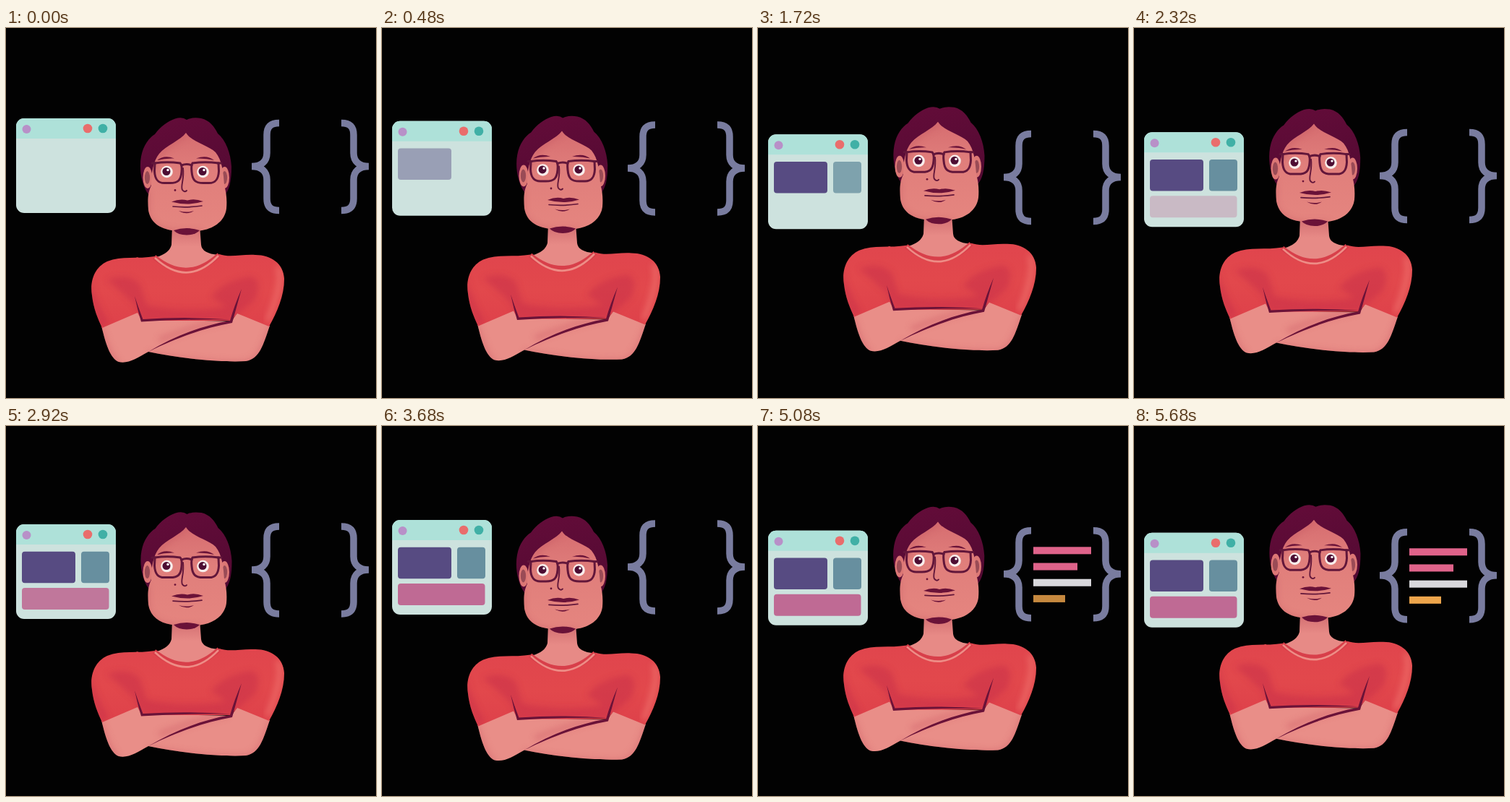
These frames come from a looping animation (512x512 px, 6000 ms). An HTML page:

```html
<!DOCTYPE html>
<html lang="en">
<head>
<meta charset="utf-8">
<title>Developer</title>
<style>
html, body { margin: 0; width: 100%; height: 100%; overflow: hidden; background: #020202; }
svg { display: block; width: 100vw; height: 100vh; }
.line { fill: none; stroke: #62163a; stroke-linecap: round; }
.dark { fill: #6a1238; }
</style>
</head>
<body>
<svg viewBox="0 0 512 512">
  <defs>
    <linearGradient id="shirt" x2="0" y2="1">
      <stop offset="0" stop-color="#e0454d"/>
      <stop offset=".5" stop-color="#e2484c"/>
      <stop offset="1" stop-color="#de414a"/>
    </linearGradient>
    <linearGradient id="face" x2="0" y2="1">
      <stop offset="0" stop-color="#d66d70"/>
      <stop offset=".4" stop-color="#e07e7b"/>
      <stop offset="1" stop-color="#e5857f"/>
    </linearGradient>
    <linearGradient id="neck" x2="0" y2="1">
      <stop offset="0" stop-color="#cf6a6e"/>
      <stop offset=".5" stop-color="#e78a86"/>
    </linearGradient>
    <linearGradient id="hairFill" x2=".3" y2="1">
      <stop offset="0" stop-color="#640c39"/>
      <stop offset="1" stop-color="#540a33"/>
    </linearGradient>
    <filter id="soft" x="-30%" y="-30%" width="160%" height="160%"><feGaussianBlur stdDeviation="4"/></filter>
    <path id="shirtShape" d="M206 316C182 320 160 315 140 323C121 332 116 352 119 370C121 388 127 402 133 415L182 394L188 405L312 405L320 395L364 413C375 393 385 371 385 347C384 326 367 314 345 314C325 313 310 318 295 313Q251 352 206 316Z"/>
    <path id="armShape" d="M132 412C138 437 144 457 156 462C169 465 181 457 197 448C240 457 296 463 332 461C351 458 356 438 365 412L320 394L312 406L189 403L183 392Z"/>
    <path id="faceShape" d="M249 145C241 156 222 162 212 174C204 184 201 200 201 218C196 228 196 238 197 252C200 270 214 279 235 280.500H268C289 278 303 266 305 250C306 238 305 228 302 218C301 200 299 183 290 172C280 162 257 158 249 145Z"/>
    <clipPath id="inShirt"><use href="#shirtShape"/></clipPath>
    <clipPath id="inArms"><use href="#armShape"/></clipPath>
    <clipPath id="inFace"><use href="#faceShape"/></clipPath>
    <path id="brace" d="M378 131.500C366 131.500 361 137 361 148V173C361 185 353 191.500 340 191.500C353 191.500 361 198 361 210V236C361 247 366 252.500 378 252.500" fill="none" stroke="#797c9f" stroke-width="9.500"/>
  </defs>

  <g id="win">
    <rect x="14" y="125" width="138" height="131" rx="11" fill="#cde2de"/>
    <path d="M14 153V136a11 11 0 0 1 11-11H141a11 11 0 0 1 11 11V153Z" fill="#aee1d9"/>
    <circle cx="28.500" cy="140" r="6" fill="#b890c8"/>
    <circle cx="113" cy="139" r="6.300" fill="#e96d6c"/>
    <circle cx="134" cy="139" r="6.300" fill="#40b0a6"/>
    <rect class="fade" x="22" y="162.700" width="74" height="43.500" rx="4" fill="#574b82"/>
    <rect class="fade" x="104" y="162.700" width="39" height="43.500" rx="4" fill="#678f9f"/>
    <rect class="fade" x="22" y="213" width="120.500" height="30" rx="4" fill="#bf6a94"/>
  </g>

  <g id="code">
    <use href="#brace"/>
    <use href="#brace" transform="matrix(-1 0 0 1 842 0)"/>
    <rect class="fade" x="381" y="154" width="80" height="10" fill="#df638a"/>
    <rect class="fade" x="381" y="176.200" width="61" height="10" fill="#df638a"/>
    <rect class="fade" x="381" y="198.400" width="80" height="10" fill="#d9d8dc"/>
    <rect class="fade" x="381" y="220.600" width="44" height="10" fill="#eda54c"/>
  </g>

  <g id="man">
    <path id="hair" fill="url(#hairFill)" d="M197 230C187 216 184 194 187 178C190 162 198 152 206 147C214 136 224 129 234 125.500Q244 122.500 250 127Q258 123 270 125C282 128 288 136 293 146C304 155 311 173 312 192C312 212 309 225 302 232Z"/>

    <path fill="url(#neck)" d="M230 272L229 300Q226 312 208 317Q250 350 294 314Q271 312 270 300L268 272Z"/>
    <use href="#armShape" fill="#e98e88"/>
    <g clip-path="url(#inArms)">
      <g filter="url(#soft)" fill="none" stroke="#d66b70" stroke-width="8" opacity=".6">
        <path d="M130 413C138 440 146 460 156 465"/>
        <path d="M197 451C240 460 296 466 332 464C352 459 358 438 367 412"/>
        <path d="M212 432Q260 412 306 404"/>
      </g>
    </g>
    <use href="#shirtShape" fill="url(#shirt)"/>
    <g clip-path="url(#inShirt)">
      <g filter="url(#soft)" fill="#c62d48" opacity=".5">
        <path d="M140 348Q172 338 186 356L194 384Q250 396 306 386L284 372Q300 350 340 344Q356 352 344 376L318 398L310 405H188L178 382Z"/>
        <path d="M117 345Q124 380 142 408L132 416L116 380Z"/>
      </g>
      <path d="M376 330Q386 348 362 406" fill="none" stroke="#ee6d69" stroke-width="6" filter="url(#soft)"/>
    </g>
    <path d="M205 317Q251 355 295 314" fill="none" stroke="#d83f4a" stroke-width="7"/>
    <path d="M206 318Q251 360 294 315" fill="none" stroke="#ee8d86" stroke-width="2.600"/>
    <path class="dark" d="M178 371Q184 389 189.500 403Q250 399 312 403.500Q250 402.500 187 406.500Q182 390 178 371Z"/>
    <path class="dark" d="M326 361Q319 386 313 408C275 415 240 427 197 448C232 427 270 412 310 405Q316 384 326 361Z"/>

    <g fill="#dc7775">
      <ellipse cx="196" cy="207" rx="6.500" ry="15"/>
      <ellipse cx="302.500" cy="207" rx="6.500" ry="15"/>
    </g>
    <g fill="#9a4b56">
      <ellipse cx="195.500" cy="207" rx="3.600" ry="9"/>
      <ellipse cx="302.500" cy="207" rx="3.600" ry="9"/>
    </g>
    <use href="#faceShape" fill="url(#face)"/>
    <g clip-path="url(#inFace)">
      <g filter="url(#soft)" fill="none" stroke="#c65a64" stroke-width="7" opacity=".5">
        <path d="M249 146C239 155 210 165 203 200"/>
        <path d="M194 226V256Q200 280 235 283H270"/>
      </g>
    </g>
    <path class="dark" d="M232 280Q250 274 268 280Q262 286.500 250 286.500Q238 286.500 232 280Z"/>

    <g class="dark">
      <path d="M209 183Q219 175 233 180.500Q220 180 209 183Z"/>
      <path d="M263 180.500Q278 175 288 183Q277 180 263 180.500Z"/>
    </g>
    <g id="eyes"></g>
    <g class="line" stroke-width="3">
      <path d="M206 187Q223 184.500 241 187Q244 190 243 199C242 211 238 214.500 227 214.500H219C209 214.500 206 208 205.500 198Z"/>
      <path d="M258 187Q276 184.500 294 187L294.500 198C294 208 291 214.500 281 214.500H273C262 214.500 258 211 257 199Q256 190 258 187Z"/>
      <path d="M243 190Q250 187 257 190M202 187H207M293 187H298"/>
    </g>
    <path class="line" stroke-width="1.900" d="M245 194C247 210 241 219 244 224Q247 228 250 225"/>
    <circle class="dark" cx="234" cy="224.500" r="1.400"/>
    <path class="dark" d="M229 240.500Q241 235.500 251 238.500Q261 235.500 273 240Q262 243.500 251 243.500Q240 243.500 229 240.500Z"/>
    <path class="line" stroke-width="1.700" d="M231 247Q251 249 271 246"/>
    <path class="dark" d="M239 253Q250 256 260 253Q250 259.500 239 253Z"/>
  </g>
</svg>
<script>
const LOOP = 6000, STEP = 40, LAST = 5680;
const $ = id => document.getElementById(id);

$("eyes").innerHTML = [222.5, 272.5].map(x => `
  <circle cx="${x}" cy="199" r="8.300" fill="#f8eeec"/>
  <circle cx="${x - 0.5}" cy="198.500" r="5.500" fill="#4d0d33"/>
  <circle cx="${x + 1.5}" cy="196.500" r="1.700" fill="#fff"/>`).join("");

// Turning points of the hovering motion
const turns = [0, 1800, 3660, 5600, 7500];
const floats = {
  win: [0, 22.4, 5, 22.8, 5],
  code: [0, 15, 3.5, 15.3, 3.5],
  man: [0, -15.2, 0.4, -15.2, 0.4]
};
const sway = [0, 1.5, 0, 1.5, 0];

// Start and duration of each fade-in: three panels, then four code lines
const fades = [
  [0, 1080], [880, 1100], [1960, 1080],
  [3680, 360], [4040, 360], [4420, 360], [4780, 360]
];
const parts = document.querySelectorAll(".fade");

function glide(values, t) {
  const i = turns.findIndex(end => t < end) - 1;
  const p = (t - turns[i]) / (turns[i + 1] - turns[i]);
  return values[i] + (values[i + 1] - values[i]) * (1 - Math.cos(Math.PI * p)) / 2;
}

function draw(t) {
  for (const id in floats)
    $(id).setAttribute("transform", `translate(0 ${glide(floats[id], t)})`);
  $("hair").setAttribute("transform", `translate(${glide(sway, t)} 0)`);
  parts.forEach((el, i) => {
    const [start, length] = fades[i];
    el.setAttribute("opacity", Math.max(0, Math.min(1, (t - start) / length)));
  });
}

const began = performance.now();
function tick() {
  const t = (performance.now() - began) % LOOP;
  draw(Math.min(LAST, Math.floor(t / STEP) * STEP));
  requestAnimationFrame(tick);
}
tick();
</script>
</body>
</html>
```
